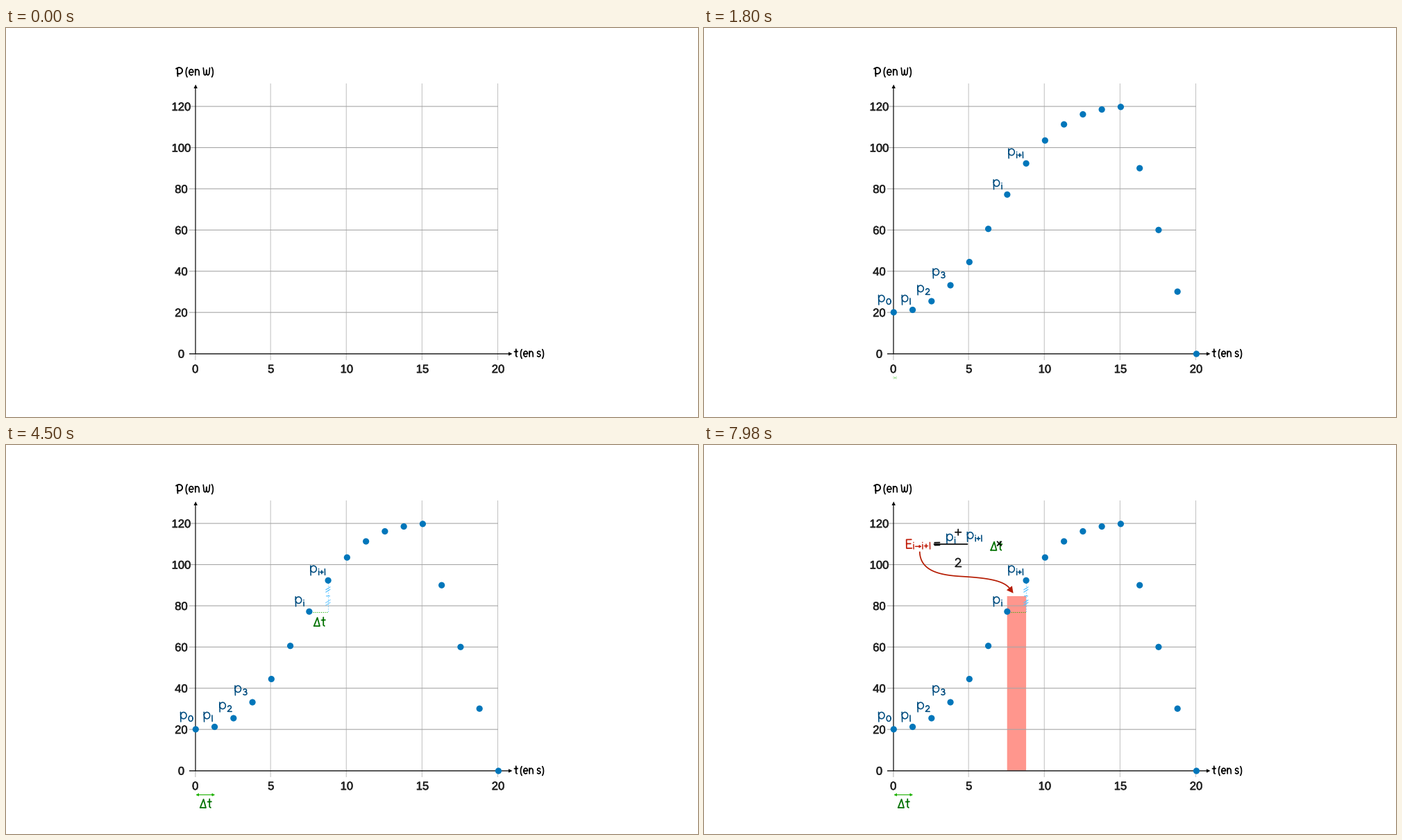
These frames come from a looping animation (997x561 px, 8000 ms). A matplotlib script:

```python
import numpy as np
import matplotlib.pyplot as plt
from matplotlib.animation import FuncAnimation
from matplotlib.colors import to_rgb
from matplotlib.patches import Circle, Polygon, Rectangle
from matplotlib.patheffects import withStroke

W, H, DPI = 997, 561, 128
LOOP, STEP = 8000, 25
PT = 72 / DPI
BLUE, NAVY, SKY = "#0076ba", "#004d80", "#56c1ff"
GREEN, LIME, RED = "#017100", "#1db100", "#b51a00"

fig = plt.figure(figsize=(W / DPI, H / DPI), dpi=DPI, facecolor="white")
ax = fig.add_axes([0, 0, 1, 1])
ax.set_xlim(0, W)
ax.set_ylim(H, 0)
ax.axis("off")


# ---------- handwritten lettering, drawn as strokes ----------
def arc(cx, cy, rx, ry, a0, a1):
    a = np.radians(np.linspace(a0, a1, 24))
    return np.column_stack([cx + rx * np.cos(a), cy + ry * np.sin(a)])


def path(*parts):
    return np.vstack([np.reshape(np.array(p, float), (-1, 2)) for p in parts])


# unit = x-height, baseline at y = 0, y points down
GLYPHS = {
    "p": [path([(0.02, -1), (0.06, 0.42)]), arc(0.46, -0.5, 0.43, 0.48, 190, 520)],
    "P": [path([(0.22, -1.15), (0.26, 0.12)]),
          path([(0, -1.05)], arc(0.48, -0.75, 0.5, 0.48, -125, 120))],
    "0": [arc(0.48, -0.62, 0.45, 0.6, 0, 360)],
    "1": [path([(0.05, -1.3), (0.08, 0)])],
    "2": [path(arc(0.42, -0.92, 0.36, 0.35, 195, 395), [(0.02, -0.02), (0.9, 0)])],
    "3": [path(arc(0.42, -0.98, 0.34, 0.29, 200, 450),
               arc(0.42, -0.34, 0.42, 0.34, 270, 505))],
    "i": [path([(0.06, -0.9), (0.08, 0)]), path([(0.06, -1.3), (0.06, -1.26)])],
    "+": [path([(0, -0.6), (0.7, -0.6)]), path([(0.35, -0.95), (0.35, -0.25)])],
    "→": [path([(0, -0.5), (1, -0.5)]),
          path([(0.75, -0.7), (1, -0.5), (0.75, -0.3)])],
    "=": [path([(0, -0.75), (0.8, -0.77)]), path([(0.02, -0.35), (0.8, -0.37)])],
    "×": [path([(0, -0.8), (0.6, -0.2)]), path([(0.6, -0.8), (0, -0.2)])],
    "Δ": [path([(0, 0), (0.5, -1.25), (0.85, 0.02), (0, 0)])],
    "t": [path([(0.28, -1.3), (0.28, -0.12), (0.45, 0)]),
          path([(0, -0.88), (0.56, -0.9)])],
    "E": [path([(0.72, -1.3), (0, -1.28), (0.02, 0), (0.78, -0.02)]),
          path([(0, -0.68), (0.62, -0.68)])],
    "(": [arc(0.5, -0.5, 0.5, 1, 125, 235)],
    ")": [arc(-0.2, -0.5, 0.5, 1, -55, 55)],
    "e": [path([(0.1, -0.5), (0.76, -0.5)], arc(0.42, -0.5, 0.36, 0.5, 0, -310))],
    "n": [path([(0.06, -1), (0.08, 0)]),
          path(arc(0.39, -0.55, 0.31, 0.43, 180, 360), [(0.72, 0)])],
    "s": [path(arc(0.35, -0.75, 0.27, 0.25, -30, -270),
               arc(0.33, -0.25, 0.3, 0.25, -90, 150))],
    "W": [path([(0, -1.25), (0.12, -0.15), (0.3, 0), (0.48, -0.15), (0.54, -0.9),
                (0.6, -0.15), (0.8, 0), (1, -0.2), (1.1, -1.25)])],
}


def write(text, x, y, unit):
    strokes = []
    for ch in text:
        if ch == " ":
            x += 0.45 * unit
            continue
        g = GLYPHS[ch]
        strokes += [s * unit + (x, y) for s in g]
        x += (max(s[:, 0].max() for s in g) + 0.27) * unit
    return strokes


class Ink:
    """A set of strokes that can be scaled about an anchor, moved and faded."""

    def __init__(self, strokes, color, width, anchor=None, z=6, shown=False):
        gap = [(np.nan, np.nan)]
        self.pts = np.vstack([np.vstack([s, gap]) for s in strokes])
        lo, hi = np.nanmin(self.pts, axis=0), np.nanmax(self.pts, axis=0)
        self.anchor = np.array(anchor) if anchor else (lo + hi) / 2
        self.width = width
        self.line, = ax.plot(*self.pts.T, color=color, lw=width * PT, zorder=z,
                             solid_capstyle="round", solid_joinstyle="round",
                             snap=False, visible=shown)

    def show(self, scale=1, alpha=1, shift=(0, 0)):
        self.line.set_visible(alpha > 0)
        if alpha > 0:
            self.line.set_data(*(self.anchor + (self.pts - self.anchor) * scale + shift).T)
            self.line.set_linewidth(self.width * scale * PT)
            self.line.set_alpha(alpha)


# ---------- chart ----------
def rule(x0, y0, x1, y1, color, width=1.1, z=2):
    ax.plot([x0, x1], [y0, y1], color=color, lw=width * PT, zorder=z,
            solid_capstyle="butt", snap=False)


def label(x, y, value):
    ax.text(x, y, str(value), family="Liberation Sans", size=16.6 * PT, color="#222222",
            ha="center", va="center_baseline", zorder=3,
            path_effects=[withStroke(linewidth=0.6 * PT, foreground="#222222")])


for k in range(5):
    x = 272.6 + 109.1 * k
    if k:
        rule(x - 0.5, 80, x - 0.5, 479, "#c6c6c6")
    label(x + 0.1, 491.2, 5 * k)
for k in range(7):
    y = 469.6 - 59.42 * k
    if k:
        rule(264, y, 709, y, "#a6a6a6")
    label(252.5, y, 20 * k)
rule(272.9, 470, 272.9, 479, "#bbbbbb")
rule(273, 86, 273, 470, "black", 1.2, 3)
rule(264, 469.9, 726, 469.9, "black", 1.3, 3)
for tip in ([(273.2, 81.5), (270.5, 87), (275.9, 87)],
            [(729.5, 469.9), (724, 467.2), (724, 472.6)]):
    ax.add_patch(Polygon(tip, color="black", lw=0, zorder=3))
Ink(write("P", 245, 68.5, 9.3), "black", 1.9, shown=True)
Ink(write("(en W)", 259.3, 68, 8.4), "black", 1.7, shown=True)
Ink(write("t", 732.5, 474, 8.3), "black", 1.8, shown=True)
Ink(write("(en s)", 741.5, 474, 7.9), "black", 1.7, shown=True)

# ---------- data points ----------
HEIGHTS = [410, 406.5, 394, 371, 337.5, 289.7, 240.2, 195.3, 162.2, 139, 124.5,
           117.5, 113.8, 202.2, 291.3, 380.2, 470]
R = 4.6
g = np.linspace(-1.2, 1.2, 72)
disc = np.zeros((72, 72, 4))
disc[..., :3] = to_rgb(BLUE)
disc[..., 3] = np.clip((1.12 - np.hypot(*np.meshgrid(g, g))) / 0.24, 0, 1)


class Dot:
    def __init__(self, x, y):
        self.pos = x, y
        self.solid = ax.add_patch(Circle(self.pos, R, color=BLUE, lw=0, zorder=5))
        self.soft = ax.imshow(disc, extent=(x - 1, x + 1, y + 1, y - 1), aspect="auto",
                              interpolation="bilinear", zorder=5)

    def show(self, scale, alpha):
        big = scale > 1.2
        self.soft.set_visible(alpha > 0 and big)
        self.solid.set_visible(alpha > 0 and not big)
        if big:
            (x, y), r = self.pos, 1.2 * R * scale
            self.soft.set_extent((x - r, x + r, y + r, y - r))
            self.soft.set_alpha(alpha)
        else:
            self.solid.set_radius(R * scale)
            self.solid.set_alpha(alpha)


dots = [Dot(273.3 + 27.26 * i, y) for i, y in enumerate(HEIGHTS)]


def point_name(sub, x, y):
    return Ink(write("p", x, y, 9.8) + write(sub, x + 11.6, y + 3.6, 6.7), NAVY, 1.6)


names = {0: point_name("0", 251.3, 395), 1: point_name("1", 285, 395),
         2: point_name("2", 307.6, 380.8), 3: point_name("3", 329.8, 356.8),
         6: point_name("i", 417, 228.6), 7: point_name("i+1", 438.6, 183.8)}
copies = [(point_name("i", 417, 228.6), (-67.5, -90.5)),
          (point_name("i+1", 438.6, 183.8), (-59.5, -48.5))]

# ---------- step width, midpoint marks, bar ----------
delta = Ink(write("Δt", 279.8, 523, 9.6), GREEN, 1.8)
delta2 = Ink(write("Δt", 443.8, 261, 9.6), GREEN, 1.8)
span = Ink([path([(274.5, 504.5), (300, 504.5)])], LIME, 1.1)
heads = [Ink([path([(x + 3 * d, 503), (x, 504.5), (x + 3 * d, 506), (x + 3 * d, 503)])],
             LIME, 1) for x, d in ((274.5, 1), (300, -1))]


def dotted(color, gap):
    line, = ax.plot([], [], color=color, lw=1.1 * PT, ls=(0, (1, gap)), zorder=4)
    return line


run, rise = dotted(LIME, 1.5), dotted(SKY, 2)


def tick(y):
    return [path([(460.8, y + 1.2 + d), (467, y - 2.8 + d)]) for d in (0, 3.4)]


ticks = [Ink(tick(207.6) + [path([(461.5, 217.8), (466.5, 217.8)])], SKY, 1.2,
             anchor=(464, 208)), Ink(tick(226.4), SKY, 1.2)]
bar = ax.add_patch(Rectangle((436.7, 218), 27.4, 0, color="#ff968d", lw=0, zorder=1,
                             snap=False))

# ---------- formula ----------
term = []
pen = 301.5
term.append(Ink(write("E", 291.7, 149, 9.8), "#c2200c", 1.8))
for ch in "i→i+1":
    term.append(Ink(write(ch, pen, 150, 7.4), "#c2200c", 1.5))
    pen += (max(s[:, 0].max() for s in GLYPHS[ch]) + 0.33) * 7.4
term.append(Ink(write("=", 332.2, 147.7, 9.2), "black", 1.8))

fraction = Ink(write("+", 362, 133, 12) + write("2", 362, 175.5, 9.4)
               + write("×", 422.6, 147, 9.6)
               + [path([(331.5, 143), (379.5, 143)])], "black", 1.9, anchor=(372, 135))


def bezier(a, b, c, d):
    t = np.linspace(0, 1, 50)[:, None]
    a, b, c, d = map(np.array, (a, b, c, d))
    return (1 - t)**3 * a + 3 * t * (1 - t)**2 * b + 3 * t * t * (1 - t) * c + t**3 * d


curve = np.vstack([bezier((310.8, 154.5), (312, 182), (340, 187.8), (372, 189.6)),
                   bezier((372, 189.6), (412, 192), (434, 196), (442, 209))])
length = np.r_[0, np.cumsum(np.hypot(*np.diff(curve, axis=0).T))]
stem, = ax.plot([], [], color=RED, lw=1.7 * PT, zorder=6)
head = ax.add_patch(Polygon([(0, 0)] * 3, color=RED, lw=0, zorder=6))


# ---------- timing ----------
def ramp(t, start, end):
    return min(max((t - start) / (end - start), 0), 1)


def ease(t, start, end):
    u = ramp(t, start, end)
    return u * u * (3 - 2 * u)


def zoom(t, start):
    """Scale and opacity of a part that drops in from far too large."""
    return 1 + 10 * (1 - ramp(t, start, start + 380))**2.4, ramp(t, start, start + 430)**1.4


def draw_arrow(u):
    stem.set_visible(u > 0)
    head.set_visible(u > 0)
    if u <= 0:
        return
    end = u * length[-1]
    tip = np.array([np.interp(end, length, curve[:, k]) for k in (0, 1)])
    stem.set_data(*np.vstack([curve[length < end], tip]).T)
    back = [np.interp(max(end - 4, 0), length, curve[:, k]) for k in (0, 1)]
    d = (tip - back) / (np.hypot(*(tip - back)) + 1e-9)
    n = np.array([-d[1], d[0]])
    head.set_xy([tip + 6 * d, tip - 3.5 * d + 5 * n, tip - 3.5 * d - 5 * n])


def update(i):
    t = i * STEP
    for k, dot in enumerate(dots):
        dot.show(*zoom(t, 450 + 30 * k))
    for k, name in names.items():
        name.show(*zoom(t, 450 + 30 * k))

    u = ease(t, 1740, 2160)
    seen = min(4 * u, 1)
    span.pts[1, 0] = 274.5 + 25.5 * u
    span.show(alpha=seen)
    heads[0].show(alpha=seen)
    heads[1].show(alpha=seen, shift=(25.5 * (u - 1), 0))
    delta.show(*zoom(t, 2130))

    run.set_data([437, 437 + 27 * ease(t, 2700, 3060)], [240.5, 240.5])
    rise.set_data([464.2, 464.2], [196, 196 + 44 * ease(t, 3420, 3840)])
    for mark, start in zip(ticks, (3840, 4170)):
        mark.show(*zoom(t, start))
    bar.set_height(251.5 * ease(t, 4670, 5650))

    for k, part in enumerate(term):
        part.show(*zoom(t, 6040 + 45 * k))
    draw_arrow(ease(t, 6200, 6850))

    go = ease(t, 6875, 7500)
    for part, (dx, dy) in copies:
        part.show(alpha=ramp(t, 4500, 4800), shift=(dx * go, dy * go))
    scale, alpha = zoom(t, 2960)
    delta2.show(scale, alpha, (-30.5 * go, -109.3 * go))
    fraction.show(*zoom(t, 7580))
    return []


anim = FuncAnimation(fig, update, frames=LOOP // STEP, interval=STEP,
                     init_func=lambda: update(0), repeat=True, repeat_delay=0, blit=False)
plt.show()
```
